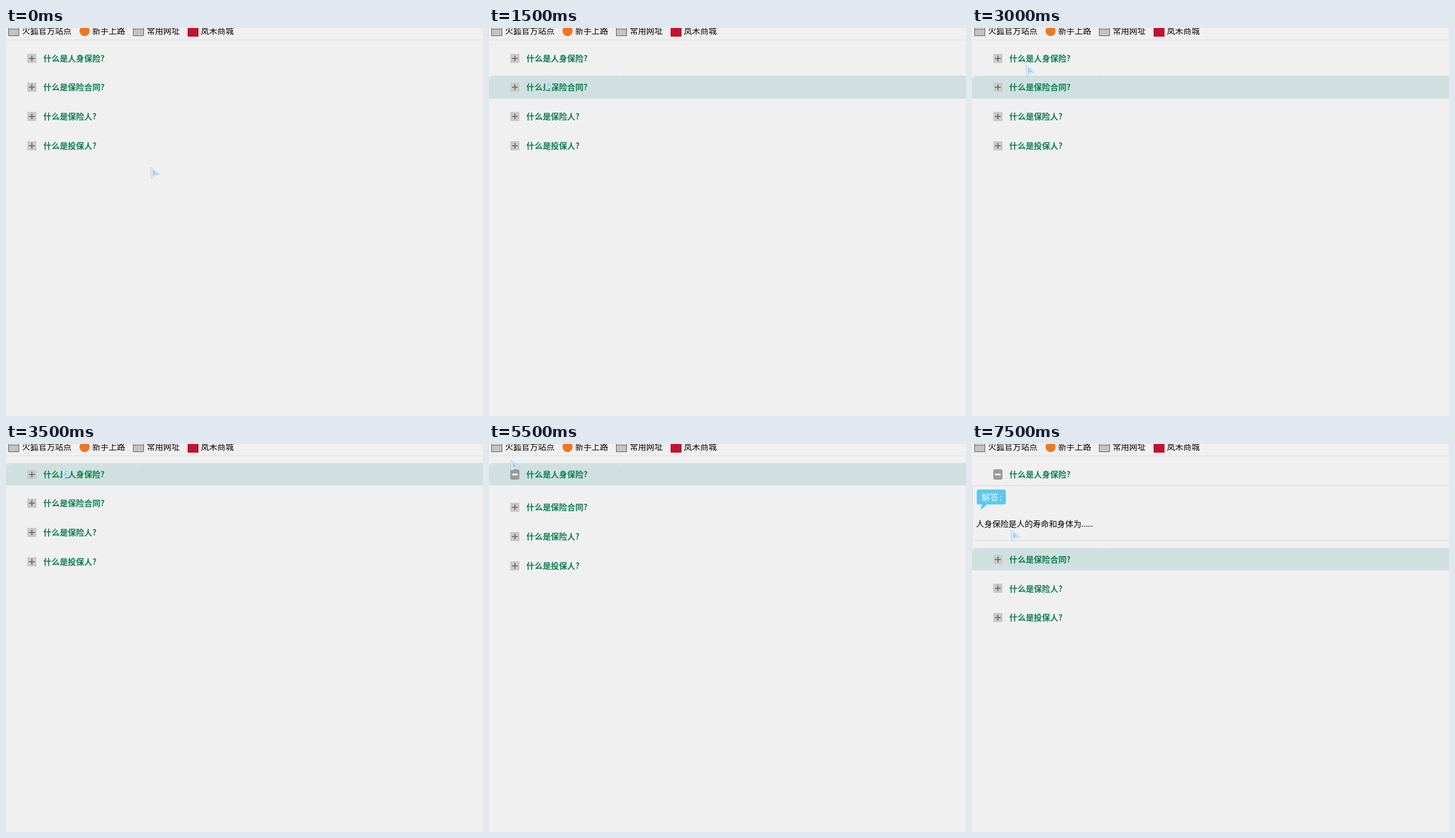
An HTML page with a canvas that plays this animation: 830 by 675 pixels, repeating every 8 s.

```html
<!DOCTYPE html>
<html lang="zh-CN">
<head>
<meta charset="utf-8">
<title>FAQ</title>
<style>
html, body { margin: 0; width: 100%; height: 100%; overflow: hidden; background: #f0f0f0; }
canvas { display: block; }
</style>
</head>
<body>
<canvas id="stage" width="830" height="675"></canvas>
<script>
const ctx = document.getElementById('stage').getContext('2d');
const CJK = '"Noto Sans CJK SC", "Noto Sans CJK", sans-serif';
const BG = '#f0f0f0';
const STEP = 500;
const OPEN = 97.5; // row offset once the answer is fully shown
const PANEL_TOP = 72;
const questions = ['什么是人身保险?', '什么是保险合同?', '什么是保险人?', '什么是投保人?'];

// cursor x, cursor y, hovered row, offset of the rows below the answer
const steps = [
  [251, 242, -1, 0], [98, 17, 0, 0], [98, 22, 0, 0], [97, 89, 1, 0],
  [127, 131, 2, 0], [86, 120, 2, 0], [93, 64, 1, 0], [97, 42, 0, 0],
  [96, 61, 1, 0], [119, 25, 0, 0], [37, 27, 0, 0], [37, 27, 0, 7],
  [37, 27, 0, 45], [37, 27, 0, 89], [37, 27, 0, OPEN], [67, 149, 1, OPEN]
];

function rect(x, y, w, h, color) {
  ctx.fillStyle = color;
  ctx.fillRect(x, y, w, h);
}

function rounded(x, y, w, h, r, color) {
  ctx.fillStyle = color;
  ctx.beginPath();
  ctx.roundRect(x, y, w, h, r);
  ctx.fill();
}

function poly(points, fill, stroke) {
  ctx.beginPath();
  points.forEach(([x, y]) => ctx.lineTo(x, y));
  ctx.closePath();
  ctx.fillStyle = fill;
  ctx.fill();
  if (stroke) {
    ctx.strokeStyle = stroke;
    ctx.stroke();
  }
}

function text(str, x, mid, color, font) {
  ctx.font = font;
  ctx.fillStyle = color;
  ctx.fillText(str, x, mid + 5.2);
}

function folder(x) {
  poly([[x + .5, -3], [x + 9, -3], [x + 11, -.5], [x + 18.5, -.5],
        [x + 18.5, 13.5], [x + .5, 13.5]], '#c3c3c3', '#5c5c5c');
  rect(x + 1, 2, 17, 1, '#808080');
}

function toolbar() {
  const label = (str, x) => text(str, x, 4.6, '#000', '14.3px ' + CJK);
  folder(4);
  label('火狐官方站点', 28);
  rounded(128, -4, 17.5, 18, 8.75, '#f2761b');
  label('新手上路', 150);
  folder(221);
  label('常用网址', 245);
  rect(316, -4, 19, 19, '#c4122a');
  label('岚禾商城', 339);
  rect(0, 20, 830, 1, '#dfdfdf');
}

function highlight(mid) {
  const top = Math.floor(mid - 19.5);
  const bottom = Math.floor(mid + 19.8);
  rounded(0, top, 830, bottom - top, [6, 0, 0, 0], '#d0e0e0');
  ctx.strokeStyle = '#dcefeb';
  ctx.beginPath();
  ctx.moveTo(1, top + 7);
  ctx.quadraticCurveTo(4, top + 1, 10, top + 4);
  ctx.moveTo(227, top + 5);
  ctx.lineTo(231, top + 2);
  ctx.stroke();
}

function toggle(mid, open) {
  const y = Math.round(mid - 8);
  if (open) {
    rounded(37, y - 1, 16, 18, 3, '#9b9b9b');
    rounded(40, y + 6.5, 10, 3, 1, '#f4f4f4');
  } else {
    rounded(37, y, 16, 16, 1, '#cacaca');
    rect(40, y + 7, 10, 2, '#747474');
    rect(44, y + 3, 2, 10, '#747474');
  }
}

function answer(shift) {
  const p = shift / OPEN;
  const x = 2.3 + 6 * p;
  const y = PANEL_TOP + .5 + 6.8 * p;
  const width = 850 * p;
  const height = Math.floor(shift) - 1;
  ctx.save();
  ctx.beginPath();
  ctx.rect(0, PANEL_TOP, width, height);
  ctx.clip();
  ctx.globalAlpha = p;
  rounded(x, y, 50.5, 26, 3, '#5ec7f0');
  poly([[x + 9, y + 25], [x + 19, y + 25], [x + 7, y + 35.5]], '#5ec7f0');
  text('解答', x + 8.5, y + 13, '#e9f8ff', '14.8px ' + CJK);
  rect(x + 40.5, y + 11, 2, 2, '#e9f8ff');
  rect(x + 40.5, y + 17, 2, 2, '#e9f8ff');
  text('人身保险是人的寿命和身体为......', x - 1.2, y + 59.2, '#000', '14.1px Lato, ' + CJK);
  ctx.restore();
  if (p > .5) {
    ctx.strokeStyle = p < 1 ? '#d0ebe2' : '#cbdfda';
    ctx.strokeRect(.5, PANEL_TOP + .5, Math.round(width), height);
  }
}

function cursor(x, y) {
  poly([[x + 1, y + .5], [x + 16, y + 12.5], [x + 9, y + 14.5], [x + 2, y + 19.5]],
       '#f1f8fd', '#a3cbe9');
  poly([[x + 3.5, y + 4], [x + 13, y + 12], [x + 8, y + 13], [x + 4, y + 16]], '#a5d2f2');
}

function draw(now) {
  const [x, y, hot, shift] = steps[Math.floor(now / STEP) % steps.length];
  ctx.lineWidth = 1;
  rect(0, 0, 830, 675, BG);
  toolbar();
  questions.forEach((q, i) => {
    const mid = 52.5 + i * 50.7 + (i ? shift : 0);
    if (i === hot) highlight(mid);
    toggle(mid, i === 0 && shift > 0);
    text(q, 65, mid, '#0b8050', 'bold 14.2px ' + CJK);
  });
  if (shift > 7) answer(shift);
  cursor(x, y);
}

const start = performance.now();
function frame() {
  draw(performance.now() - start);
  requestAnimationFrame(frame);
}
frame();
</script>
</body>
</html>
```
